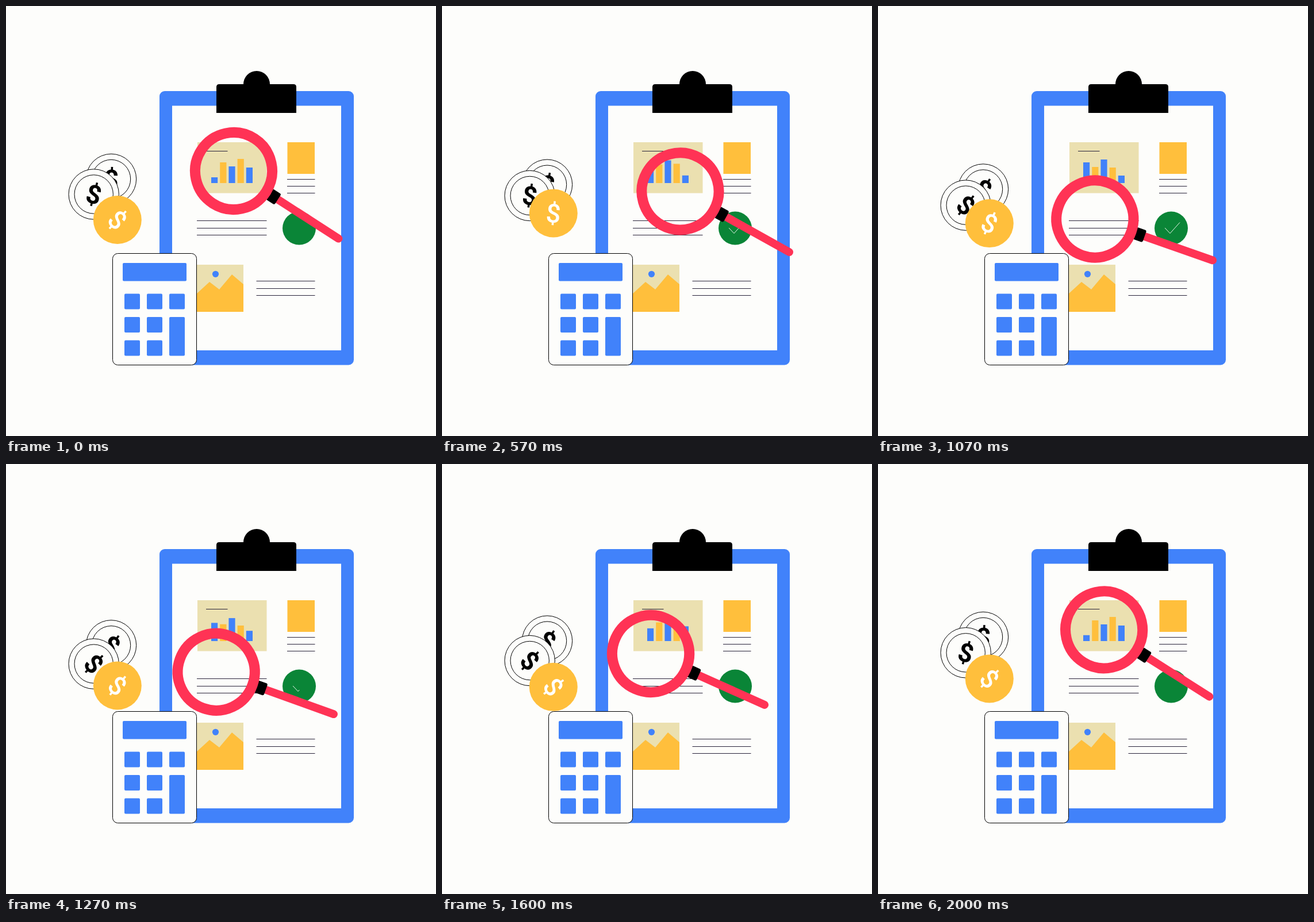
These frames come from a looping animation (748x748 px, 2.03 s). An HTML page:

```html
<!DOCTYPE html>
<html lang="en">
<head>
<meta charset="utf-8">
<title>Report review</title>
<style>
  html, body { margin: 0; width: 100%; height: 100%; overflow: hidden; background: #fdfdfb; }
  svg { display: block; width: 100vw; height: 100vh; }
  .blue { fill: #4182fa; }
  .gold { fill: #ffbf3c; }
  .sand { fill: #ebe0b0; }
  .paper { fill: #fdfdfb; }
  .rule { stroke: #29233a; stroke-width: 1; fill: none; }
  .coin { fill: #fdfdfb; stroke: #000; stroke-width: 1; }
  text { font: 500 45px Roboto, Arial, sans-serif; text-anchor: middle; }
  .dark { font-weight: 700; }
</style>
</head>
<body>
<svg viewBox="0 0 748 748">
  <rect class="blue" x="267" y="148" width="338" height="476.5" rx="9"/>
  <rect class="paper" x="289" y="173.5" width="294" height="425.5"/>
  <circle cx="436" cy="136" r="23"/>
  <path d="M366 186V141q0-5 5-5H500q5 0 5 5V186z"/>

  <rect class="sand" x="333" y="237" width="120.5" height="88.5"/>
  <path class="rule" d="M348 252.5H385.5"/>
  <g id="bars"></g>
  <rect class="gold" x="489.5" y="237" width="47.5" height="55"/>
  <path class="rule" d="M489 301.5H537.5M489 313.5H537.5M489 325.5H537.5"/>
  <path class="rule" d="M332 373.5H453.5M332 386.5H453.5M332 398.5H453.5"/>
  <path class="rule" d="M435.5 478.5H537.5M435.5 491.5H537.5M435.5 503.5H537.5"/>
  <rect class="sand" x="331" y="450" width="82" height="82"/>
  <path class="gold" d="M331 501L354 480L371 493L393 467L413 484V532H331z"/>
  <circle class="blue" cx="364.5" cy="466.3" r="5.6"/>

  <circle cx="510" cy="386.5" r="29" fill="#0a8537"/>
  <path id="tick" d="M499 386L508 395.5L525 376.5" pathLength="1" stroke-dasharray="1 2"
        fill="none" stroke="#e9f5ea" stroke-width="1"/>

  <g id="lens">
    <path d="M88 0H217" stroke="#ff3355" stroke-width="14" stroke-linecap="round"/>
    <rect x="73.5" y="-11" width="18" height="22" rx="3"/>
    <circle r="67" fill="none" stroke="#ff3355" stroke-width="18"/>
  </g>

  <g id="coins"></g>

  <rect class="paper" x="185.5" y="430.5" width="146" height="194" rx="9" stroke="#000"/>
  <rect class="blue" x="203" y="447" width="111" height="31.5" rx="2"/>
  <g id="keys"></g>
</svg>
<script>
const LOOP = 2030, STEPS = 61;
const TIMES = [0, 330, 770, 1070, 1430, 1770];
const $ = id => document.getElementById(id);

function add(parent, tag, attrs, text) {
  const el = document.createElementNS('http://www.w3.org/2000/svg', tag);
  for (const key in attrs) el.setAttribute(key, attrs[key]);
  if (text) el.textContent = text;
  return parent.appendChild(el);
}

// Periodic cubic track; "settle" stops it from overshooting its poses.
function track(values, settle) {
  const n = values.length;
  const at = i => values[(i + n) % n];
  const time = i => TIMES[(i + n) % n] + Math.floor(i / n) * LOOP;
  const rate = i => (at(i + 1) - at(i)) / (time(i + 1) - time(i));
  const slope = i => {
    const a = rate(i - 1), b = rate(i);
    if (settle) return a * b <= 0 ? 0 : 2 * a * b / (a + b);
    return (at(i + 1) - at(i - 1)) / (time(i + 1) - time(i - 1));
  };
  return t => {
    let i = n - 1;
    while (TIMES[i] > t) i--;
    const span = time(i + 1) - time(i), u = (t - time(i)) / span, v = 1 - u;
    return at(i) * (1 + 2 * u) * v * v + slope(i) * span * u * v * v
      + at(i + 1) * u * u * (3 - 2 * u) - slope(i + 1) * span * u * u * v;
  };
}

const lensX = track([396, 417, 405.5, 377, 361, 371]);
const lensY = track([287, 295.5, 347.5, 370.5, 347.5, 310.5]);
const lensTurn = track([32.8, 33, 25, 19.3, 21.5, 27.6]);

const bars = [
  [298, 298, 272, 272, 282, 290],
  [272, 272, 279, 280, 277, 274],
  [279, 272, 267, 267, 270, 278],
  [266, 270, 278, 281, 281, 268],
  [281, 294, 295, 295, 285, 281]
].map((tops, i) => ({
  top: track(tops, true),
  el: add($('bars'), 'rect', { class: i % 2 ? 'gold' : 'blue', x: 357 + i * 15.2, width: 11.2 })
}));

const coins = [
  { x: 183, y: [301, 305, 315.5, 318.5, 311.5, 304], turn: [2, 2, 19, 32, 36, 23] },
  { x: 152.7, y: [327.5, 324.5, 336.5, 346.7, 346, 336.5], turn: [14, 1, 18, 38, 47, 33] },
  { x: 193.8, y: [372, 360.8, 363.8, 378.3, 389, 383.6], turn: [43, 18, 0, 25, 49, 55], gold: true }
].map(({ x, y, turn, gold }) => {
  const el = add($('coins'), 'g', {});
  if (gold) add(el, 'circle', { class: 'gold', r: 42 });
  else for (const r of [43.7, 33.7]) add(el, 'circle', { class: 'coin', r });
  const sign = add(el, 'text', { class: gold ? '' : 'dark', y: 16, fill: gold ? '#fff' : '#000' }, '$');
  return { x, el, sign, y: track(y), turn: track(turn) };
});

const keys = [];
for (let row = 0; row < 3; row++) {
  for (let col = 0; col < 3; col++) {
    if (row === 2 && col === 2) continue;
    const w = 27, h = row === 1 && col === 2 ? 67.5 : 27;
    const el = add($('keys'), 'rect', { class: 'blue', x: -w / 2, y: -h / 2, width: w, height: h, rx: 2 });
    const key = { el, x: 206 + col * 39 + w / 2, y: 500.5 + row * 40.5 + h / 2 };
    place(el, key.x, key.y);
    keys.push(key);
  }
}
const presses = [
  { key: keys[6], time: 330, depth: 0.14 },
  { key: keys[0], time: 770, depth: 0.1 },
  { key: keys[5], time: 1770, depth: 0.07 }
];

function place(el, x, y, rest = '') {
  el.setAttribute('transform', `translate(${x} ${y}) ${rest}`);
}

function ramp(t, from, to) {
  const u = Math.min(1, Math.max(0, (t - from) / (to - from)));
  return u * u * (3 - 2 * u);
}

function draw(t) {
  place($('lens'), lensX(t), lensY(t), `rotate(${lensTurn(t)})`);
  for (const { el, top } of bars) {
    const y = top(t);
    el.setAttribute('y', y);
    el.setAttribute('height', 308 - y);
  }
  for (const c of coins) {
    place(c.el, c.x, c.y(t));
    c.sign.setAttribute('transform', `rotate(${c.turn(t)})`);
  }
  for (const { key, time, depth } of presses) {
    const u = Math.min(1, Math.abs(t - time) / 140);
    place(key.el, key.x, key.y, `scale(${1 - depth * Math.cos(u * Math.PI / 2) ** 2})`);
  }
  const shown = ramp(t, 30, 320) - ramp(t, 1100, 1400);
  $('tick').style.strokeDashoffset = 1 - shown;
  $('tick').style.visibility = shown > 0.01 ? 'visible' : 'hidden';
}

const start = performance.now();
function tick(now) {
  const t = Math.max(0, now - start) % LOOP;
  draw(Math.floor(t * STEPS / LOOP + 0.05) % STEPS * LOOP / STEPS);
  requestAnimationFrame(tick);
}
draw(0);
requestAnimationFrame(tick);
</script>
</body>
</html>
```
